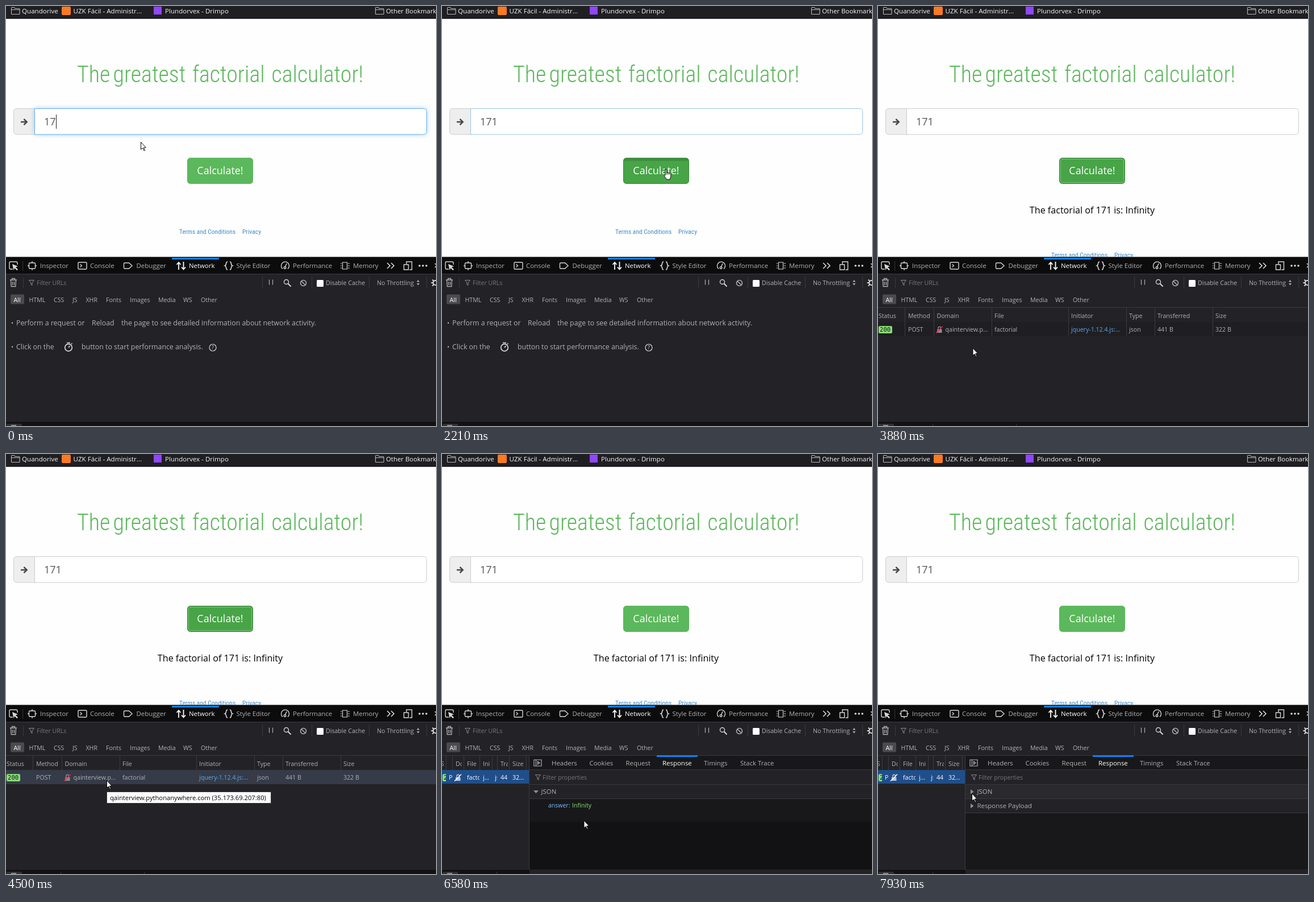
An HTML page with a canvas that plays this animation: 757 px wide and 739 px high, repeating every 8 s.

```html
<!DOCTYPE html>
<html lang="en">
<head>
<meta charset="utf-8">
<title>Factorial calculator</title>
<style>
html, body { margin: 0; width: 757px; height: 739px; overflow: hidden; background: #232327; }
canvas { display: block; }
</style>
</head>
<body>
<canvas id="stage" width="757" height="739"></canvas>
<script>
const LOOP = 8000;
const ctx = document.getElementById('stage').getContext('2d');
const SANS = '"Open Sans", "Noto Sans", sans-serif';
const NARROW = '"Roboto Condensed", Roboto, sans-serif';
const GREY = '#b1b1b3', PALE = '#d7d7db', DIM = '#75757a', LINE = '#3a3a3f', BLUE = '#0a84ff';

// [time, x, y] of the pointer tip; each position holds until the next
const POINTER = [
  [0, 237.5, 239.5], [1670, 246, 247], [1760, 283, 280], [1850, 328, 312], [1940, 368, 304],
  [2030, 394, 288], [2780, 250, 480], [2870, 142.5, 677.5], [3340, 142, 676], [3430, 141.5, 674.5],
  [3610, 144, 668], [3700, 150, 652], [3790, 158, 628], [3880, 167, 602], [3960, 174, 584],
  [4040, 177.5, 574.5], [5240, 178, 590], [5330, 179, 606], [5510, 179.5, 607], [5670, 181.5, 610],
  [5850, 193, 619], [5940, 204, 626], [6130, 215, 629], [6220, 224, 631], [6310, 230, 632],
  [6580, 250, 645], [6670, 266, 668], [6760, 275, 698], [6850, 271, 715], [6940, 250, 700],
  [7030, 220, 668], [7120, 190, 634], [7210, 162, 605], [7300, 150, 597], [7390, 155, 597],
  [7480, 159, 595], [7660, 165, 590], [7840, 165.5, 597.5]
];

function rect(x, y, w, h, color) {
  ctx.fillStyle = color;
  ctx.fillRect(x, y, w, h);
}

function box(x, y, w, h, radius, fill, stroke) {
  ctx.beginPath();
  ctx.roundRect(x, y, w, h, radius);
  if (fill) { ctx.fillStyle = fill; ctx.fill(); }
  if (stroke) { ctx.strokeStyle = stroke; ctx.lineWidth = 1; ctx.stroke(); }
}

// y is the middle of the capital letters
function text(str, x, y, size, color, { font = SANS, align = 'left' } = {}) {
  ctx.font = `${size}px ${font}`;
  ctx.textAlign = align;
  ctx.fillStyle = color;
  ctx.fillText(str, x, y + size * 0.36);
}

function narrow(str, x, baseline, size, color, weight) {
  ctx.fontStretch = 'condensed';
  ctx.font = `${weight} ${size}px ${NARROW}`;
  ctx.textAlign = 'left';
  ctx.fillStyle = color;
  ctx.fillText(str, x, baseline);
  ctx.fontStretch = 'normal';
}

function line(d, color = PALE, width = 1.4) {
  ctx.strokeStyle = color;
  ctx.lineWidth = width;
  ctx.stroke(new Path2D(d));
}

function shape(d, color = PALE) {
  ctx.fillStyle = color;
  ctx.fill(new Path2D(d));
}

function ring(x, y, r, color = PALE, width = 1.4) {
  ctx.beginPath();
  ctx.arc(x, y, r, 0, 7);
  ctx.strokeStyle = color;
  ctx.lineWidth = width;
  ctx.stroke();
}

function clipped(x, y, w, h, draw) {
  ctx.save();
  ctx.beginPath();
  ctx.rect(x, y, w, h);
  ctx.clip();
  draw();
  ctx.restore();
}

function folder(x) {
  line(`M${x} 3.5q0-1 1-1h4l1.5 2h7q1 0 1 1v8q0 1-1 1h-12.5q-1 0-1-1zM${x} 6.5h14.5`, '#b8b8bc', 1.1);
}

function funnel(x, y) {
  line(`M${x} ${y}h9l-3.5 4.5v4.5l-2-1.5v-3z`, '#8a8a90', 1);
}

function bookmarks() {
  rect(0, 0, 757, 22, '#1f1f23');
  rect(0, 21, 757, 1, '#0c0c0d');
  rect(0, 22, 757, 1, '#77777a');
  folder(9.5);
  text('Quandorive', 28, 9, 11.6, '#f4f4f6');
  box(98, 1, 16, 15, 2, '#fb7a24');
  text('UZK Fácil - Administr...', 118.5, 9, 11.6, '#f4f4f6');
  rect(260, 1, 14, 14, '#9146ff');
  text('Plundorvex - Drimpo', 280, 9, 11.6, '#f4f4f6');
  folder(650.5);
  text('Other Bookmarks', 669, 9, 11.4, '#f4f4f6');
}

function input(t) {
  const focused = t < 2210;
  box(13.5, 180.5, 40, 45.5, [5, 0, 0, 5], '#eeeeee', '#cccccc');
  line('M26 204h10M31.5 198.8l5.2 5.2-5.2 5.2', '#4a4a4a', 2.6);
  ctx.save();
  if (focused) {
    ctx.shadowColor = 'rgba(102,175,233,.6)';
    ctx.shadowBlur = 8;
  }
  box(50.5, 180.5, 690, 45.5, [0, 5, 5, 0], '#ffffff');
  ctx.restore();
  box(50.5, 180.5, 690, 45.5, [0, 5, 5, 0], '#ffffff',
    focused ? '#66afe9' : t < 2300 ? '#99c2e0' : '#cccccc');
  const typed = t >= 930;
  text(typed ? '171' : '17', 67, 203.5, 18, '#555555');
  const caretOn = t < 90 || (t >= 650 && t < 1210) || (t >= 1670 && focused);
  if (caretOn) rect(typed ? 99 : 88, 191, 1, 25, '#222222');
}

function button(t) {
  const dark = t >= 2030 && t < 4870;
  box(319.5, 267.5, 115, 45, 5, dark ? '#47a447' : '#5cb85c', dark ? '#398439' : '#56b456');
  if (t >= 2210 && t < 2370) {
    line('M321 270.5h112', 'rgba(0,0,0,.14)', 4);
  } else if (t >= 2370 && dark) {
    ctx.setLineDash([1, 1]);
    box(321.5, 269.5, 111, 41, 3, null, '#b5dbb5');
    ctx.setLineDash([]);
  }
  text('Calculate!', 377, 290, 18, '#ffffff', { align: 'center' });
}

function page(t) {
  rect(0, 23, 757, 419, '#fefefe');
  const title = { The: 125, greatest: 188.5, factorial: 328, 'calculator!': 467.5 };
  for (const [word, x] of Object.entries(title)) narrow(word, x, 134, 40, '#5cb85c', 300);
  input(t);
  button(t);
  const done = t >= 2780;
  if (done) text('The factorial of 171 is: Infinity', 377, 359.5, 16.1, '#000000', { align: 'center' });
  const y = done ? 442 : 401;
  narrow('Terms and Conditions', 305, y, 11.5, '#428bca', 400);
  narrow('Privacy', 416, y, 11.5, '#428bca', 400);
}

function toolbox() {
  rect(0, 441, 757, 298, '#232327');
  rect(0, 441, 757, 31, '#0c0c0d');
  rect(0, 441, 757, 1, '#77777a');
  rect(0, 471, 757, 1, LINE);
  rect(292, 443, 83, 3, BLUE);
  rect(29, 449, 1, 17, LINE);

  line('M20 455v-3q0-2-2-2h-10q-2 0-2 2v9q0 2 2 2h4');
  shape('M11 454l10 4-4 1.5 4 4-1.8 1.8-4-4-1.7 3.7z');
  line('M42 452h8q1.5 0 1.5 1.5v7q0 1.5-1.5 1.5h-8q-1.5 0-1.5-1.5v-7q0-1.5 1.5-1.5zM46 449v3M46 462v3M38 457h3M51 457h3');
  line('M128.5 451h12q1.5 0 1.5 1.5v9q0 1.5-1.5 1.5h-12q-1.5 0-1.5-1.5v-9q0-1.5 1.5-1.5zM130.5 454.5l3 2.5-3 2.5');
  line('M209 452h7.5l5.5 5-5.5 5h-7.5q-1.5 0-1.5-1.5v-7q0-1.5 1.5-1.5z');
  line('M304 464v-13M300.5 455l3.5-4 3.5 4M312.5 450v13M309 459.5l3.5 4 3.5-4', '#ffffff', 1.8);
  line('M390 450c-4 0-1 6-4.5 7 3.5 1 .5 7 4.5 7M394 450c4 0 1 6 4.5 7-3.5 1-.5 7-4.5 7', PALE, 1.6);
  line('M487 462.5a7 7 0 1 1 9 0M491.5 459l2.5-6');
  ring(491, 460.5, 1.8);
  line('M592.5 451h8v12h-8zM589 453h2M589 457h2M589 461h2M602 453h3M602 457h3M602 461h3', PALE, 1.2);
  line('M671 452l5 5-5 5M678 452l5 5-5 5', PALE, 1.6);
  line('M705 454v-4h9.5v14h-4M700.5 455h8v9h-8z');
  for (const x of [728, 734, 740]) box(x - 1.8, 455.2, 3.6, 3.6, 1.8, PALE);
  line('M755 453l7 7M755 460l7-7');

  const tabs = { Inspector: 60, Console: 148, Debugger: 229.5, Network: 322, 'Style Editor': 405.5, Performance: 505, Memory: 611 };
  for (const [name, x] of Object.entries(tabs)) text(name, x, 457, 11.4, name === 'Network' ? '#ffffff' : GREY);

  line('M7 482h12M10.5 482v-2.5h5v2.5M8.5 482.5l.7 11h7.6l.7-11M11.5 485v6M14.5 485v6', GREY, 1.3);
  rect(30, 478, 1, 18, LINE);
  funnel(40.5, 482.5);
  text('Filter URLs', 54, 487, 10.6, DIM);
  for (const x of [451, 538, 639, 740]) rect(x, 476, 1, 21, LINE);
  line('M463.5 481.5v9M469.5 481.5v9', GREY, 1.2);
  ring(493.5, 485.5, 4);
  line('M496.5 488.5l5 5', PALE, 2);
  ring(523.5, 487.5, 5, GREY, 1.5);
  line('M520 484l7 7', GREY, 1.5);
  box(547, 482, 12, 12, 1.5, '#ffffff');
  text('Disable Cache', 563, 487, 10.6, GREY);
  text('No Throttling', 653, 487, 10.6, GREY);
  shape('M723 485.5l2.5-3.5 2.5 3.5zM723 488l2.5 3.5 2.5-3.5z', GREY);
  ring(756, 487, 4, PALE, 2);
  line('M748.5 487h3M750.5 481.5l2.5 2.5M750.5 492.5l2.5-2.5', PALE, 1.8);

  box(8, 507.5, 24, 17, 2, '#4a4a4f');
  const filters = { All: 13.5, HTML: 40.5, CSS: 84, JS: 117, XHR: 140.5, Fonts: 176, Images: 218, Media: 268, WS: 312, Other: 343 };
  for (const [name, x] of Object.entries(filters)) text(name, x, 517, 10.6, name === 'All' ? '#ffffff' : GREY);
}

function statusBar(hasRequest) {
  rect(0, 732, 757, 7, '#121214');
  rect(0, 732, 757, 1, '#0c0c0d');
  box(1, 735, 27, 6, 1, '#303034');
  rect(9, 737, 9, 2, '#88888c');
  if (hasRequest) for (const x of [96, 243]) rect(x, 735, 1, 4, LINE);
}

function emptyNotice() {
  text('•', 9, 558, 11, GREY);
  text('Perform a request or', 18, 558, 12.35, GREY);
  text('Reload', 151, 558, 12.35, GREY);
  text('the page to see detailed information about network activity.', 203, 558, 12.35, GREY);
  text('•', 9, 600, 11, GREY);
  text('Click on the', 18, 600, 12.35, GREY);
  ring(110, 601, 6.3, PALE, 1.7);
  line('M107 592.5h6M110 601l2.5-3M115 595l1.5-1.5', PALE, 1.7);
  text('button to start performance analysis.', 133, 600, 12.35, GREY);
  ring(364, 601, 6, PALE, 1.2);
  text('?', 364, 601, 9, PALE, { align: 'center' });
}

function lock(x, body, slash) {
  shape(`M${x + 2} 569h8.5v6h-8.5z`, body);
  line(`M${x + 4} 569v-2.5a2.3 2.3 0 0 1 4.6 0v2.5`, body, 1.4);
  line(`M${x} 575.5l12-12`, slash, 1.5);
}

function badge() {
  box(1, 563, 24, 13, 2.5, '#86de74');
  text('200', 3, 569.5, 10.6, '#18181a', { font: '"DejaVu Sans Mono", "Liberation Mono", monospace' });
}

function fullTable(t) {
  const done = t >= 2780;
  const hovered = t >= 3960;
  rect(0, 530, 757, 1, LINE);
  rect(0, 556, 757, 25, t >= 4870 ? '#204e8a' : hovered ? '#353b48' : '#1f1f23');
  for (const x of [47, 98, 200, 335, 437, 487, 589]) rect(x, 531, 1, 50, LINE);
  const heads = { Status: 1, Method: 53, Domain: 103.5, File: 205, Initiator: 340, Type: 442, Transferred: 492, Size: 594 };
  for (const [head, x] of Object.entries(heads)) text(head, x, 545.5, 10.6, GREY);
  const cell = (str, x, color = GREY) => text(str, x, 569.5, 10.6, color);
  cell('POST', 53);
  lock(102, '#8a8a90', '#e22850');
  cell('qainterview.p...', 118.5);
  cell('factorial', heads.File);
  cell('jquery-1.12.4.js:...', heads.Initiator, '#5fa8f0');
  if (done) {
    badge();
    cell('json', heads.Type);
    cell('441 B', heads.Transferred);
    cell('322 B', heads.Size);
  }
}

function tooltip() {
  rect(177, 594, 290, 21, '#3c3c40');
  rect(178, 595, 288, 19, '#ffffff');
  text('qainterview.pythonanywhere.com (35.173.69.207:80)', 183, 605, 11.2, '#000000');
}

function slimTable() {
  rect(0, 530, 154, 1, LINE);
  rect(0, 556, 153, 24, '#204e8a');
  for (const x of [7, 18, 38, 66, 88, 97, 118, 148]) rect(x, 531, 1, 25, LINE);
  const cells = [
    ['S', -2, 5, ''], ['', 12, 6, 'P'], ['Domain', 24, 11, ''], ['File', 44, 22, 'factorial'],
    ['Ini', 72, 15, 'j...'], ['', 93, 4, 'js'], ['Tra', 103, 13, '44'], ['Size', 124, 25, '32...']
  ];
  for (const [head, x, w, value] of cells) {
    clipped(x, 531, w, 50, () => {
      text(head, x, 545.5, 10.6, GREY);
      text(value, x, 569.5, 10.6, '#ffffff');
    });
  }
  clipped(0, 556, 7, 25, badge);
  lock(22, '#b9c6dc', '#ffffff');
}

function section(label, y, open, hovered) {
  rect(154, y - 12, 603, 24, hovered ? '#2a2a2e' : '#232327');
  rect(154, y + 12, 603, 1, '#38383d');
  shape(open ? `M161 ${y - 2}h9l-4.5 5z` : `M163 ${y - 4}v8.5l5.5-4.25z`, '#8f8f94');
  text(label, 174.5, y, 11.4, GREY);
}

function details(t, [, x, y]) {
  const open = t < 7840;
  // the pane repaints a shade lighter as the pointer sweeps down it
  const repainted = t < 5670 ? 0 : t < 6130 ? 20 : t < 6670 ? 40 : 124;
  rect(153, 530, 604, 202, '#121214');
  rect(154, 607, 603, repainted, '#18181a');
  rect(153, 530, 1, 202, LINE);
  rect(154, 531, 603, 25, '#18181a');
  rect(154, 556, 603, 25, '#232327');
  for (const top of [530, 555, 581]) rect(154, top, 603, 1, '#38383d');
  rect(378, 530, 72, 3, BLUE);
  line('M162 538h13v11h-13zM165.5 538v11M168.5 541l3.5 2.5-3.5 2.5z', GREY, 1.2);
  const tabs = { Headers: 193, Cookies: 259.5, Request: 323.5, Response: 388, Timings: 461, 'Stack Trace': 525 };
  for (const [name, left] of Object.entries(tabs)) text(name, left, 543.5, 11.45, name === 'Response' ? '#ffffff' : GREY);
  funnel(164.5, 564.5);
  text('Filter properties', 177, 569.5, 10.5, DIM);
  section('JSON', 594, open, x > 154 && y >= 582 && y < 606);
  if (open) {
    text('answer:', 187, 618, 10.5, '#75bfff');
    text('Infinity', 229, 618, 10.6, '#86de74');
  } else {
    section('Response Payload', 619, false, false);
  }
  rect(154, 731, 603, 8, '#232327');
}

function pointer(t, [, x, y]) {
  const hand = t >= 2030 && t < 2780;
  const d = hand
    ? 'M5 0c1.2 0 2 .8 2 2v6c0-2 3-2 3 0 0-1.6 3-1.6 3 .5 0-1.5 3-1 3 1v5c0 3-2 4-2 7h-7c-1-3-5-6-5.5-8.5-.3-1.6 1.5-2 2.5-.5v-12.5c0-1.2 0-2 1-2z'
    : 'M0 0v16l4-3 3 6 2-1-3-6h5z';
  ctx.save();
  ctx.translate(hand ? x - 4 : x, y);
  ctx.scale(0.8, 0.8);
  shape(d, '#ffffff');
  line(d, '#000000', 1.2);
  if (hand) line('M7 8v3M10 8v3M13 9v2.5', '#000000', 1);
  ctx.restore();
}

function render(t) {
  const tip = POINTER.findLast(key => key[0] <= t);
  const hasRequest = t >= 2520;
  bookmarks();
  page(t);
  toolbox();
  statusBar(hasRequest);
  if (!hasRequest) emptyNotice();
  else if (t < 4960) fullTable(t);
  else {
    slimTable();
    details(t, tip);
  }
  if (t >= 4500 && t < 4870) tooltip();
  pointer(t, tip);
}

const start = performance.now();
function tick() {
  render((performance.now() - start) % LOOP);
  requestAnimationFrame(tick);
}
tick();
</script>
</body>
</html>
```
